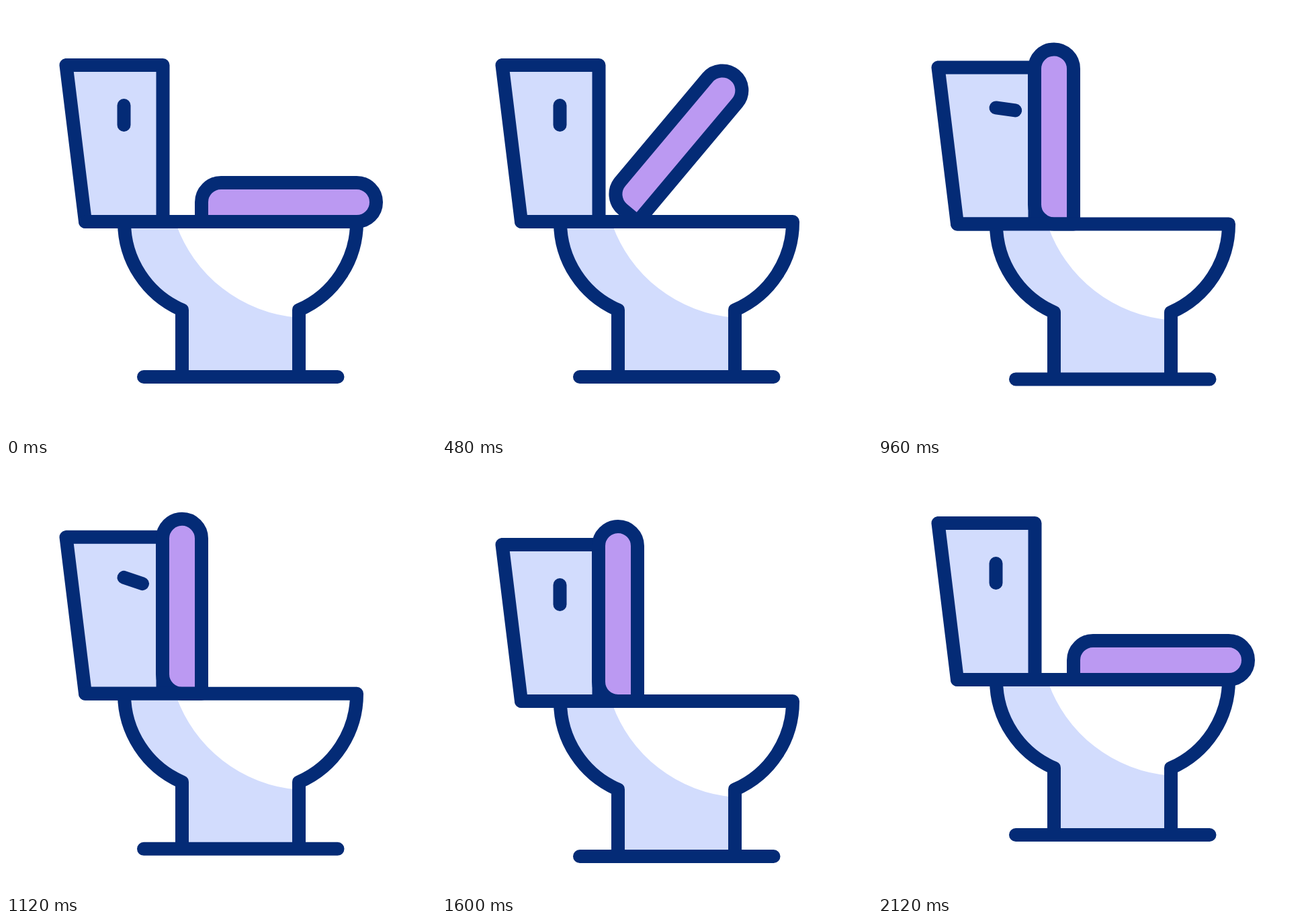
These frames come from a looping animation (640x640 px, 2.2 s). An HTML page:

```html
<!DOCTYPE html>
<html>
<head>
<meta charset="utf-8">
<style>
  html, body { margin: 0; width: 100%; height: 100%; overflow: hidden; background: #fff; }
  svg { display: block; width: 100%; height: 100%; }
  g { fill: none; stroke: #042b76; stroke-width: 20; stroke-linecap: round; stroke-linejoin: round; }
  .pale { fill: #d2dcfd; }
</style>
</head>
<body>
<svg viewBox="0 0 640 640">
  <g id="toilet">
    <path class="pale" d="M89.500 88H233.500V321H118Z"/>
    <path id="handle" d="M175.500 148V177"/>
    <path id="lid" fill="#bb99f2" d="M291 321V292A29 29 0 0 1 320 263H522A29 29 0 0 1 522 321Z"/>
    <path class="pale" stroke="none" d="M176 321A143 143 0 0 0 262 452V552H436V464A210 210 0 0 1 252 321Z"/>
    <path d="M118 321H522A143 143 0 0 1 436 452.500V552M176 321A143 143 0 0 0 262 452.500V552M205 552H493.500"/>
  </g>
  <g><path id="drops" stroke="#ff9100"/></g>
</svg>
<script>
const LOOP = 2200;
const el = id => document.getElementById(id);
const toilet = el('toilet'), handle = el('handle'), lid = el('lid'), drops = el('drops');

// Cubic ease from 0 to 1 with horizontal tangents of length a and 1 - b
function ease(t, start, end, a = 1 / 3, b = 2 / 3) {
  const x = Math.min(1, Math.max(0, (t - start) / (end - start)));
  let lo = 0, hi = 1;
  for (let i = 0; i < 24; i++) {
    const s = (lo + hi) / 2, r = 1 - s;
    if (3 * s * r * r * a + 3 * s * s * r * b + s ** 3 < x) lo = s;
    else hi = s;
  }
  const s = (lo + hi) / 2;
  return s * s * (3 - 2 * s);
}

function draw(t) {
  const sink = 32 * (ease(t, 880, 1280) - ease(t, 1600, 1840));
  const open = 90 * (ease(t, 40, 880, 0.55, 0.45) - ease(t, 1600, 2120, 0.4, 0.225));
  const turn = 90 * (ease(t, 545, 1055) - ease(t, 1055, 1280));
  toilet.setAttribute('transform', `translate(0 ${sink})`);
  lid.setAttribute('transform', `rotate(${-open} 291 321)`);
  handle.setAttribute('transform', `rotate(${-turn} 175.500 148)`);

  const top = 215 + 29 * ease(t, 1420, 1600);
  const bottom = 215 + 29 * ease(t, 1180, 1350);
  drops.setAttribute('d', `M359 ${top}V${bottom}M436.500 ${top}V${bottom}`);
  drops.style.display = t > 1180 && t < 1600 ? '' : 'none';
}

const begin = performance.now();
function tick() {
  draw((performance.now() - begin) % LOOP);
  requestAnimationFrame(tick);
}
tick();
</script>
</body>
</html>
```
